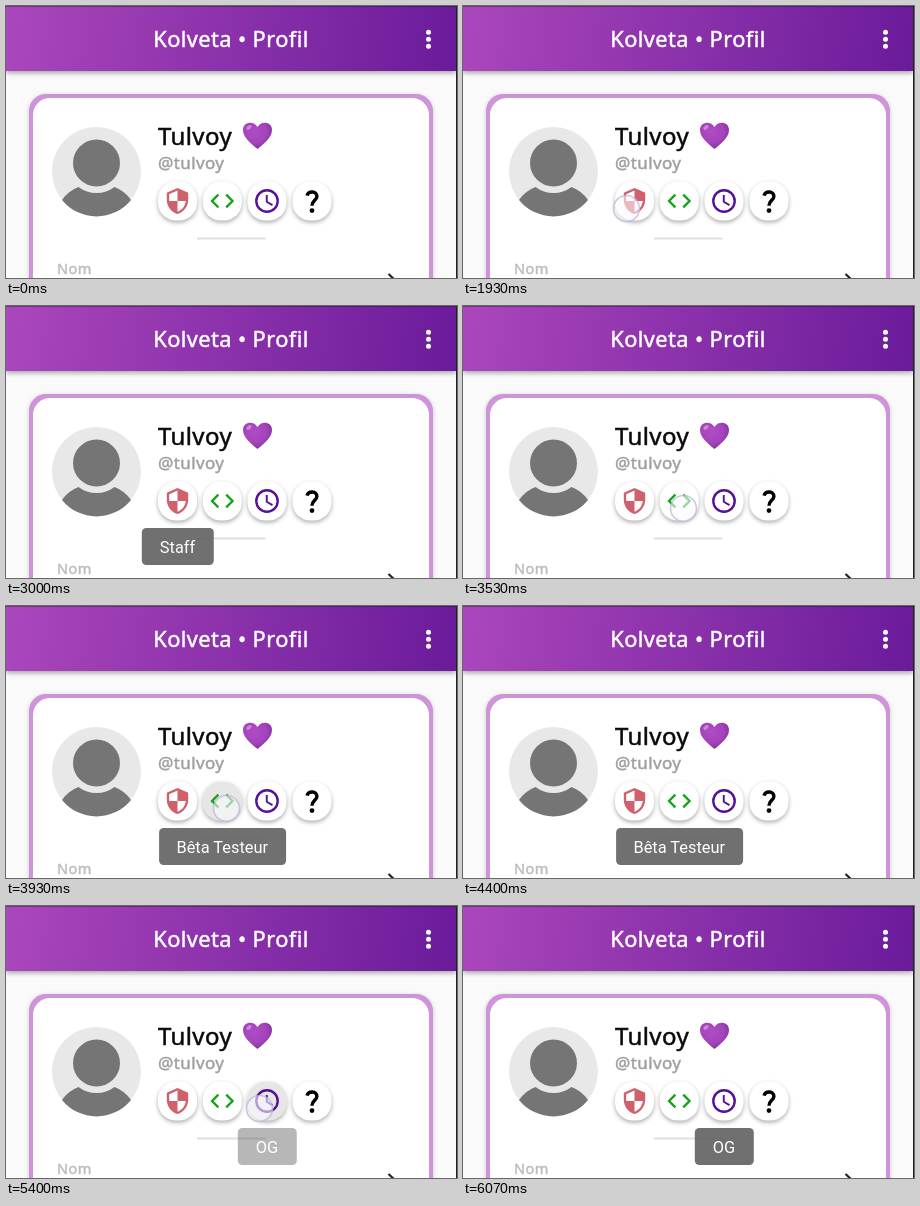
Animation, 451 px wide and 272 px high, one loop 6.54 s. Source, as an HTML page:

```html
<!DOCTYPE html>
<html lang="fr">
<head>
<meta charset="utf-8">
<title>Profil</title>
<style>
  html, body { margin: 0; width: 100%; height: 100%; overflow: hidden; background: #fafafa; }
  svg { display: block; width: 451px; height: 272px; }
  .label { font-family: "Noto Sans", "Open Sans", sans-serif; letter-spacing: .4px; stroke: currentColor; fill: currentColor; stroke-width: .5; }
  .bar { filter: drop-shadow(0 2px 2.7px rgba(0, 0, 0, .35)); }
  .card { fill: #ce93d8; filter: drop-shadow(0 1px 2px rgba(0, 0, 0, .2)); }
  .badge { fill: #fff; filter: drop-shadow(0 2.3px 2.2px rgba(0, 0, 0, .32)); }
  .ripple, .touch, .tip { opacity: 0; }
  .splash { transform-box: fill-box; transform-origin: center; }
  .touch { fill: rgba(250, 250, 253, .58); stroke: rgba(186, 181, 214, .7); stroke-width: 1.7; }
  .tip rect { fill: #616161; fill-opacity: .9; }
  .tip text { font: 400 16.4px Roboto, sans-serif; fill: #fff; text-anchor: middle; }
</style>
</head>
<body>
<svg viewBox="0 0 451 272">
  <defs>
    <linearGradient id="purple" gradientUnits="userSpaceOnUse" x1="0" y1="0" x2="450" y2="65">
      <stop stop-color="#ab47bc"/><stop offset="1" stop-color="#6a1b9a"/>
    </linearGradient>
    <radialGradient id="heart" cx=".4" cy=".35" r=".7">
      <stop stop-color="#b04cc6"/><stop offset=".6" stop-color="#a443bb"/><stop offset="1" stop-color="#7e2f9c"/>
    </radialGradient>
  </defs>

  <rect width="451" height="272" fill="#fafafa"/>
  <rect class="card" x="23" y="88" width="404" height="234" rx="17"/>
  <rect x="27" y="92" width="396" height="226" rx="17" fill="#fff"/>

  <rect class="bar" width="450" height="65" fill="url(#purple)"/>
  <rect width="450" height="1" fill-opacity=".3"/>
  <text class="label" x="225" y="41" font-size="21.8" color="#fff" text-anchor="middle">Kolveta • Profil</text>
  <g fill="#fff">
    <circle cx="422.5" cy="26.3" r="2.5"/><circle cx="422.5" cy="33.3" r="2.5"/><circle cx="422.5" cy="40.3" r="2.5"/>
  </g>

  <circle cx="90.5" cy="165.5" r="44.5" fill="#e8e8e8"/>
  <g fill="#757575">
    <circle cx="90.5" cy="157" r="23.5"/>
    <path d="M56 194Q62 185 72.500 181A30 30 0 0 0 108.500 181Q119 185 125 194A44.5 44.5 0 0 1 56 194Z"/>
  </g>

  <text class="label" x="152" y="138.5" font-size="24" color="#0a0a0a">Tulvoy</text>
  <path fill="url(#heart)" d="M251.500 143C246 138.500 237 132 237 124C237 115.500 248 114.500 251.500 121C255 114.500 266 115.500 266 124C266 132 257 138.500 251.500 143Z"/>
  <ellipse cx="243" cy="121.500" rx="3" ry="1.800" fill="#cb86da" transform="rotate(-40 243 121.500)"/>
  <text class="label" x="152" y="162.500" font-size="17" color="#a0a0a0">@tulvoy</text>

  <g id="badges"></g>

  <path d="M191 232.500H259.500" stroke="#e0e0e0" stroke-width="2"/>
  <text class="label" x="51" y="268" font-size="14.6" color="#bdbdbd">Nom</text>
  <path d="M382.500 268L390 275" fill="none" stroke="#222" stroke-width="2.300"/>
  <path d="M450.500 0V272" stroke="#222"/>
  <g id="overlay"></g>
</svg>

<script>
const LOOP = 6540, TICK = 1000 / 15;

const icons = [
  `<path fill="#d0606c" d="M12 1L3 5v6c0 5.550 3.840 10.740 9 12 5.160-1.260 9-6.450 9-12V5l-9-4zm0 10.990h7c-.530 4.120-3.280 7.790-7 8.940V12H5V6.300l7-3.110v8.800z"/>`,
  `<path fill="none" stroke="#16a41a" stroke-width="2" d="M8.700 6.700L3.400 12l5.300 5.300M15.300 6.700L20.600 12l-5.300 5.300"/>`,
  `<g fill="none" stroke="#56109a"><circle cx="12" cy="12" r="9" stroke-width="2"/><path stroke-width="1.600" d="M11.800 7v5.600l4.800 2.900"/></g>`,
  `<path fill="none" stroke="#000" stroke-width="2.900" d="M7.800 7.500C9 3.300 16.200 3.400 16.100 8.200C16 11.500 12 11.600 12 16"/><circle cx="12" cy="20" r="2"/>`
];
const badgeX = [171.5, 216.3, 261, 306];
const badgeY = 195;

// Times in ms: finger down, ripple start, tooltip shown, ripple fade, release, touch gone, tooltip hidden.
const presses = [
  { label: "Staff", width: 72, x: 163.5, down: 1930, ripple: 2000, show: [2470, 2670], fade: 2470, up: 2670, gone: 3000, hide: 3400 },
  { label: "Bêta Testeur", width: 127, x: 220.5, down: 3400, ripple: 3470, show: [3800, 3930], fade: 3930, up: 4130, gone: 4400, hide: 4870 },
  { label: "OG", width: 59, x: 253.5, down: 4870, ripple: 4935, show: [5330, 5470], fade: 5400, up: 5470, gone: 5730, hide: LOOP }
];

document.getElementById("badges").innerHTML = badgeX.map((x, i) => {
  const shape = `x="${x - 19.5}" y="${badgeY - 19.5}" width="39" height="39" rx="18"`;
  const press = presses[i];
  const ripple = press ? `
    <clipPath id="clip${i}"><rect ${shape}/></clipPath>
    <g class="ripple" clip-path="url(#clip${i})">
      <rect ${shape} fill-opacity=".07"/>
      <circle class="splash" cx="${press.x}" cy="202.500" r="46" fill-opacity=".03"/>
    </g>` : "";
  return `<rect class="badge" ${shape}/>${ripple}
    <g transform="translate(${x} ${badgeY}) scale(1.190) translate(-12 -12)">${icons[i]}</g>`;
}).join("");

document.getElementById("overlay").innerHTML = presses.map((p, i) => `
  <g class="tip">
    <rect x="${badgeX[i] + .3 - p.width / 2}" y="222" width="${p.width}" height="37" rx="4.500"/>
    <text x="${badgeX[i]}" y="246.500">${p.label}</text>
  </g>
  <circle class="touch" cx="${p.x}" cy="202.500" r="13"/>`).join("");

// Each step is [ms, value]; segments advance in whole ticks.
function play(el, prop, steps) {
  const all = [[0, steps[0][1]], ...steps, [LOOP, steps.at(-1)[1]]];
  const frames = all.map(([ms, value], i) => {
    const span = (all[i + 1] || [ms])[0] - ms;
    return {
      offset: ms / LOOP,
      [prop]: value,
      easing: `steps(${Math.max(1, Math.round(span / TICK))}, end)`
    };
  });
  el.animate(frames, { duration: LOOP, iterations: Infinity });
}

const all = name => document.querySelectorAll("." + name);
const ripples = all("ripple"), splashes = all("splash"), touches = all("touch"), tips = all("tip");

presses.forEach((p, i) => {
  play(touches[i], "opacity", [[p.down, 0], [p.down, 1], [p.up, 1], [p.gone, 0]]);
  play(ripples[i], "opacity", [[p.ripple, 0], [p.ripple + 200, 1], [p.fade, 1], [p.fade + 200, 0]]);
  play(splashes[i], "transform", [[p.ripple, "scale(.2)"], [p.fade, "scale(.85)"], [p.fade + 200, "scale(1)"]]);
  const shown = [[p.show[0], 0], [p.show[1], 1], [p.hide, 1]];
  play(tips[i], "opacity", p.hide < LOOP ? [...shown, [p.hide, 0]] : shown);
});
</script>
</body>
</html>
```
